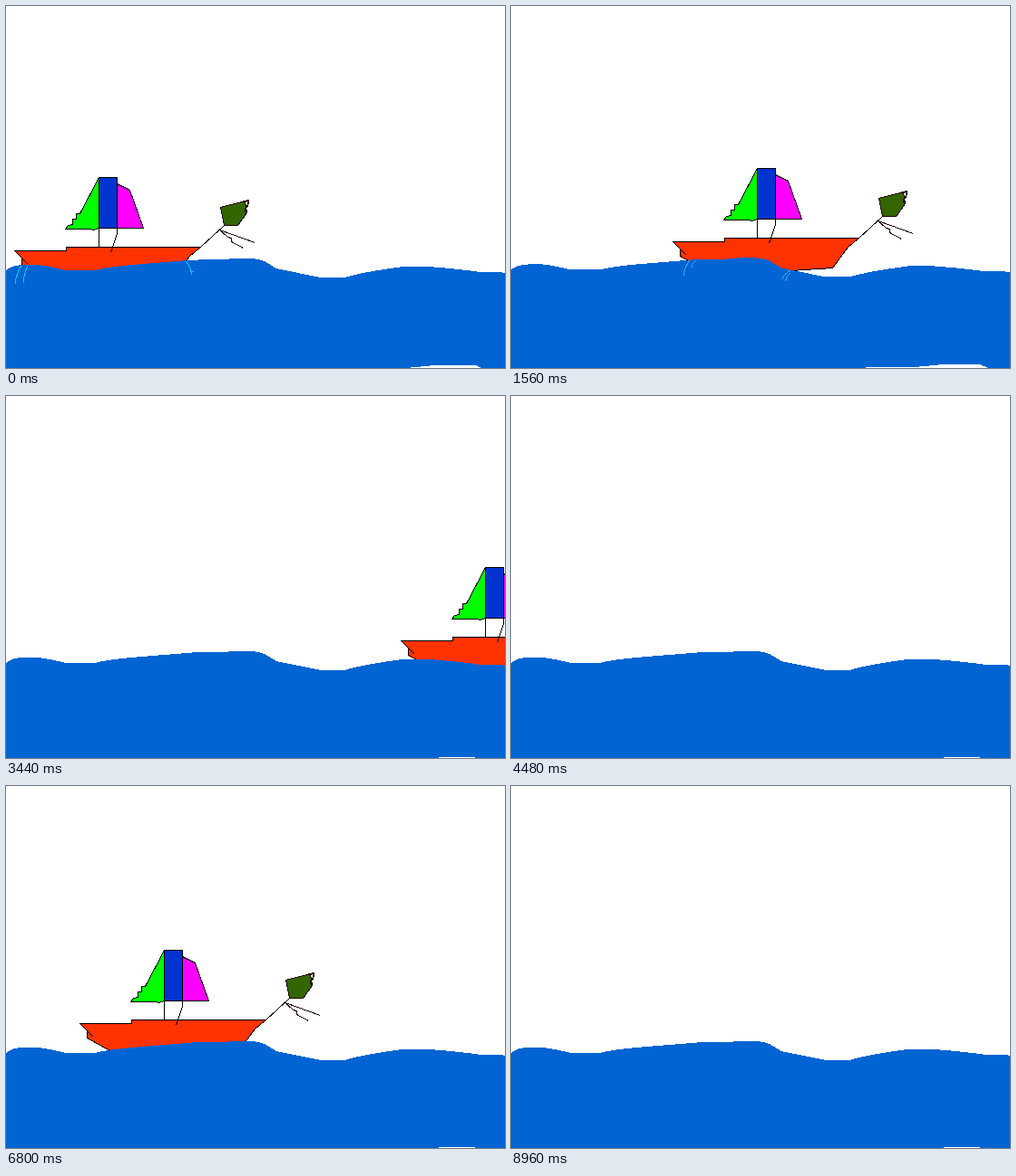
Animation of 550x400 px, one loop 9.6 s. Source, as an HTML page:

```html
<!DOCTYPE html>
<html lang="en">
<head>
<meta charset="utf-8">
<title>Sailing boat</title>
<style>
  html, body { margin: 0; width: 100%; height: 100%; overflow: hidden; background: #fff; }
  svg { display: block; width: 550px; height: 400px; }
</style>
</head>
<body>
<svg viewBox="0 0 550 400" shape-rendering="crispEdges" fill="none" stroke-linejoin="round">
  <!-- Boat coordinates are relative to the tip of the stern -->
  <g id="boat" stroke="#000">
    <path fill="#ff3300" d="M0 0H57V-4H205L193 6 176 29 69 36V30H33L8 16V8Z"/>
    <path d="M0 0L15 15M93 -25V-4M113 -25V-19L106 2M205 -4L231 -28"/>
    <path fill="#00ff00" d="M93 -81L72 -41H68V-35H64V-29L59 -28 56 -24H84L87 -23 93 -25Z"/>
    <path fill="#ff00ff" d="M113 -74L127 -67 142 -25H113Z"/>
    <path fill="#0033d0" d="M93 -81H113V-25H93Z"/>
    <g stroke="#220000">
      <path d="M226 -23L265 -9M226 -23L235 -15 239 -14V-10L252 -3"/>
      <path fill="#336600" d="M227 -48L254 -55 256 -42 246 -28H231Z"/>
      <path stroke-width="1.6" d="M253 -54L258 -56 257 -50 254 -46 256 -41"/>
    </g>
  </g>
  <path id="water" fill="#0064d2" d="M0 295Q7 289 20 289H35Q46 290 66 295H98Q112 291 150 288L205 283.5 240 283 250 282H268Q282 282 290 288L298 293 347 303H373Q392 297 437 291H467Q495 293 520 296.5L545 297 550 298V410H526V403.6L517 399.4H478L446 402.4 392 403 380 403.6V410H0Z"/>
  <path id="splash"/>
</svg>
<script>
const LOOP = 9600, STEP = 40;
const $ = id => document.getElementById(id);
const boat = $('boat'), water = $('water'), splash = $('splash');

// One crossing: visible steps, [step, x] stops, and the wave that lifts the boat
const passes = [
  { from: 0, to: 112, stops: [[0, 10], [39, 179], [62, 307], [86, 436]],
    wave: { mid: 29, half: 28, slope: 0.55, peak: 14 } },
  { from: 134, to: 224, stops: [[134, -262], [147, -97], [191, 246], [224, 552]],
    wave: { mid: 184, half: 26, slope: 0.65, peak: 12 } }
];
const WET_STEPS = 50;

const lerp = (a, b, p) => a + (b - a) * p;

// Steady speed between stops, carried on past the last one
function travel(stops, n) {
  const i = Math.max(1, stops.findLastIndex(([step]) => step <= n));
  const k = Math.min(stops[i] && n >= stops[i][0] ? i + 1 : i, stops.length - 1);
  const [n0, x0] = stops[k - 1], [n1, x1] = stops[k];
  return lerp(x0, x1, (n - n0) / (n1 - n0));
}

function lift({ mid, half, slope, peak }, n) {
  const ramp = slope * (half - Math.abs(n - mid));
  return Math.max(0, Math.min(peak, ramp));
}

function show(el, visible) {
  el.setAttribute('visibility', visible ? 'visible' : 'hidden');
}

const drop = (x, y, w, h) => `M${x} ${y}q${w * 0.8} ${h * 0.4} ${w} ${h}`;

// Spray at stern and bow slides along the hull as the boat climbs
function drawSplash(p) {
  const sternX = lerp(17, 197, p), sternY = lerp(287, 281, p);
  const bowX = lerp(198, 308, p), bowY = lerp(282, 292, p);
  const bowSlant = lerp(7, -9, p);
  splash.setAttribute('d',
    drop(sternX, sternY, -7, lerp(20, 17, p)) +
    drop(sternX + 7, sternY, -5, lerp(19, 8, p)) +
    drop(bowX, bowY, bowSlant, lerp(15, 10, p)) +
    drop(bowX + lerp(5, 0, p), bowY + lerp(11, 3, p), bowSlant * 0.6, lerp(0, 9, p)));
  splash.setAttribute('stroke', `rgb(${lerp(0, 51, p)},${lerp(204, 165, p)},255)`);
}

function render(ms) {
  const n = Math.floor((ms % LOOP) / STEP);

  const pass = passes.find(({ from, to }) => n >= from && n < to);
  show(boat, pass);
  if (pass) {
    const x = Math.round(travel(pass.stops, n)) - 0.5;
    const y = 270.5 - Math.round(lift(pass.wave, n));
    boat.setAttribute('transform', `translate(${x} ${y})`);
  }

  const wet = n < WET_STEPS;
  water.setAttribute('transform', `translate(0 ${wet ? -2.9 - n * 0.016 : 0})`);
  show(splash, wet);
  if (wet) drawSplash(n / 39);
}

let start;
function tick(now) {
  start ??= now;
  render(now - start);
  requestAnimationFrame(tick);
}
render(0);
requestAnimationFrame(tick);
</script>
</body>
</html>
```
